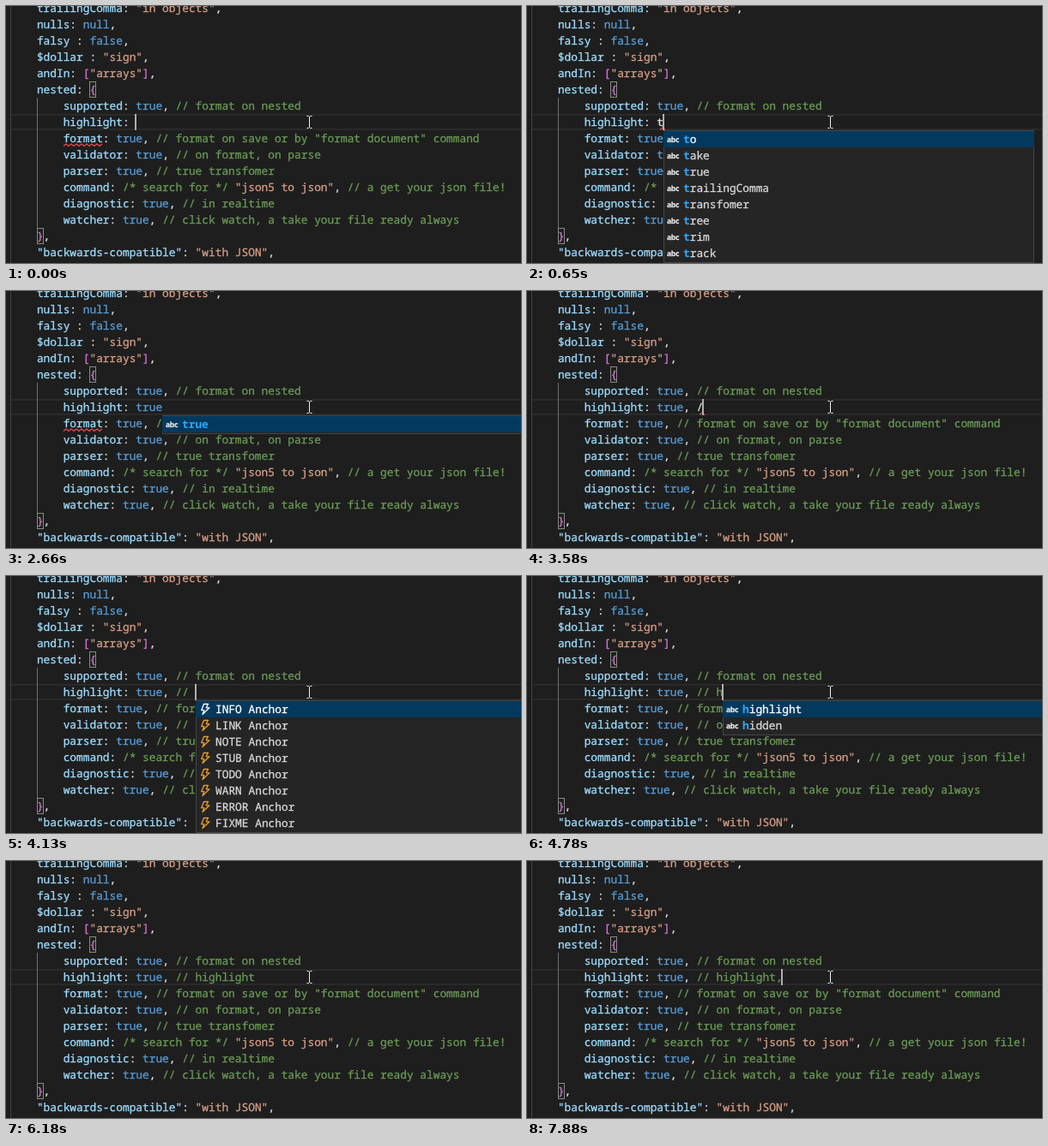
An HTML page that plays this animation: 600 px wide and 300 px high, repeating every 8 s.

```html
<!DOCTYPE html>
<html lang="en">
<head>
<meta charset="utf-8">
<title>Typing in a code editor</title>
<style>
  html, body { margin: 0; width: 100%; height: 100%; overflow: hidden; background: #1e1e1e; }
  svg { display: block; width: 600px; height: 300px; }
  text, tspan { fill: currentColor; stroke: currentColor; }
  text {
    font: 12.83px "Noto Sans Mono", "DejaVu Sans Mono", monospace;
    text-rendering: geometricPrecision;
    white-space: pre;
    stroke-width: .3px;
  }
  .abc { font: 700 8.5px "Open Sans", Roboto, sans-serif; letter-spacing: -.3px; }
  .hit { color: #2aaaff; font-weight: 700; stroke-width: 0; }
</style>
</head>
<body>
<svg viewBox="0 0 600 300">
  <g id="back"></g>
  <g id="live"></g>
  <path fill="none" stroke="#f0f0f0" d="M350.5 128.5h2l1 1l1 -1h2M353.5 129v13M350.5 142.5h2l1 -1l1 1h2"/>
</svg>
<script>
const LOOP = 8000, CH = 7.697, ROW = 19, TOP = -7, LEFT = 4.5;
const ACTIVE = 7;            // line being typed
const ACTIVE_Y = TOP + ACTIVE * ROW;
const POP_W = 432;

const lines = [
  '    trailingComma: "in objects",',
  '    nulls: null,',
  '    falsy : false,',
  '    $dollar : "sign",',
  '    andIn: ["arrays"],',
  '    nested: {',
  '        supported: true, // format on nested',
  '',
  '        format: true, // format on save or by "format document" command',
  '        validator: true, // on format, on parse',
  '        parser: true, // true transfomer',
  '        command: /* search for */ "json5 to json", // a get your json file!',
  '        diagnostic: true, // in realtime',
  '        watcher: true, // click watch, a take your file ready always',
  '    },',
  '    "backwards-compatible": "with JSON",'
];

const rules = [
  [/^(\/\/.*|\/\*.*?\*\/)/, '#6a9955'],
  [/^("[^"]*"|\$?\w+)(?=\s*:)/, '#9cdcfe'],
  [/^"[^"]*"/, '#d69d85'],
  [/^(true|false|null)\b/, '#569cd6'],
  [/^[{}\[\]]/, '#da70d6'],
  [/^(\w+|[^\s])/, '#dcdcdc']
];

const anchors = ['INFO', 'LINK', 'NOTE', 'STUB', 'TODO', 'WARN', 'ERROR', 'FIXME'].map(w => w + ' Anchor');
const trWords = ['true', 'trailingComma', 'transfomer', 'tree', 'trim', 'track'];
const tWords = ['to', 'take', ...trWords];
const hiWords = ['highlight', 'hidden'];

// time, text after "highlight: ", options
const steps = [
  [0, '', {}],
  [250, '', { off: 1 }],
  [650, 't', { list: tWords, hit: 1, err: 1 }],
  [910, 'tr', { list: trWords, hit: 2, err: 1 }],
  [1070, 'tru', { list: ['true'], hit: 3, err: 1 }],
  [1220, 'true', { list: ['true'], hit: 4 }],
  [1750, 'true', { list: ['true'], hit: 4, off: 1 }],
  [2150, 'true', { list: ['true'], hit: 4 }],
  [2660, 'true', { list: ['true'], hit: 4, off: 1 }],
  [2810, 'true,', {}],
  [3330, 'true, ', {}],
  [3580, 'true, /', { err: 1 }],
  [3870, 'true, //', { list: anchors, bolt: 1 }],
  [4130, 'true, // ', { list: anchors, bolt: 1 }],
  [4660, 'true, // h', { list: anchors, bolt: 1, lag: 1 }],
  [4780, 'true, // h', { list: hiWords, hit: 1 }],
  [4900, 'true, // hi', { list: hiWords, hit: 2 }],
  [5150, 'true, // hig', { list: ['highlight'], hit: 3 }],
  [5670, 'true, // highlight', {}],
  [6180, 'true, // highlight', { off: 1 }],
  [6710, 'true, // highlight ', {}],
  [7230, 'true, // highlight ', { off: 1 }],
  [7480, 'true, // highlight', {}],
  [7880, 'true, // highlight,', {}]
];

const colX = col => LEFT + col * CH;
const safe = s => s.replace(/&/g, '&amp;').replace(/</g, '&lt;');
const rect = (x, y, w, h, fill) => `<rect x="${x}" y="${y}" width="${w}" height="${h}" fill="${fill}"/>`;

function codeLine(src, row) {
  let out = '', col = 0;
  while (col < src.length) {
    const rest = src.slice(col);
    const rule = rules.find(r => r[0].test(rest));
    if (!rule) { col++; continue; }
    const word = rest.match(rule[0])[0];
    out += `<text x="${(colX(col) + .6).toFixed(2)}" y="${TOP + row * ROW + 14}" color="${rule[1]}">${safe(word)}</text>`;
    col += word.length;
  }
  return out;
}

function squiggle(x, y, w) {
  let d = `M${x} ${y + 2.5}`;
  for (let i = 3, up = true; i <= w; i += 3, up = !up) d += `L${x + i} ${up ? y : y + 2.5}`;
  return `<path d="${d}" fill="none" stroke="#f14c4c" stroke-width="1.1"/>`;
}

function bracketBox(col, row) {
  return `<rect x="${Math.floor(colX(col)) + 1.5}" y="${TOP + row * ROW + .5}" width="7" height="18" fill="#006400" fill-opacity=".1" stroke="#888"/>`;
}

function popup(x, { list, hit = 0, bolt }) {
  const y = ACTIVE_Y + ROW;
  let out = rect(x, y, POP_W, list.length * ROW + 3, '#454545') +
    rect(x + 1, y + 1, POP_W - 2, list.length * ROW + 1, '#252526') +
    rect(x, y + 1, POP_W, ROW, '#04395e');
  list.forEach((label, i) => {
    const top = y + 1 + i * ROW;
    out += bolt
      ? `<path transform="translate(${x + 5.5} ${top + 3.5})" d="M4 0h5L6.7 4.3H10.5L2.5 12L4.3 7.2H1.2Z" fill="none" stroke="${i ? '#ee9d28' : '#fff'}" stroke-width="1.3" stroke-linejoin="round"/>`
      : `<text class="abc" x="${x + 4}" y="${top + 13}" color="#e8e8e8">abc</text>`;
    out += `<text x="${x + 23}" y="${top + 14}" color="${i ? '#d8d8d8' : '#fff'}">` +
      `<tspan class="hit">${label.slice(0, hit)}</tspan>${label.slice(hit)}</text>`;
  });
  return out;
}

function drawBack() {
  const guides = rect(5, 0, 1, 300, '#404040') + rect(36, TOP + 6 * ROW, 1, 8 * ROW, '#707070');
  const current = rect(5, ACTIVE_Y, 595, 2, '#2a2a2a') + rect(5, ACTIVE_Y + ROW - 2, 595, 2, '#2a2a2a');
  back.innerHTML = current + guides + bracketBox(12, 5) + bracketBox(4, 14) +
    lines.map(codeLine).join('');
}

function drawStep([time, typed, opt]) {
  const src = '        highlight: ' + typed;
  const caret = Math.floor(colX(src.length));
  const formatErr = time < 650 || typed === 'true';
  let out = codeLine(src, ACTIVE);
  if (formatErr) out += squiggle(67, 161, 46);
  if (opt.err) out += squiggle(caret - 3, ACTIVE_Y + 16, 8);
  if (!opt.off) out += rect(caret, ACTIVE_Y, 2, ROW, '#aeafad');
  if (opt.list) out += popup(Math.floor(colX(src.length - (opt.lag || 0))) + 1, opt);
  live.innerHTML = out;
}

const back = document.getElementById('back');
const live = document.getElementById('live');
let shown = null;

function tick() {
  const t = performance.now() % LOOP;
  const step = steps.filter(s => s[0] <= t).pop();
  if (step !== shown) drawStep(shown = step);
  requestAnimationFrame(tick);
}

drawBack();
tick();
</script>
</body>
</html>
```
